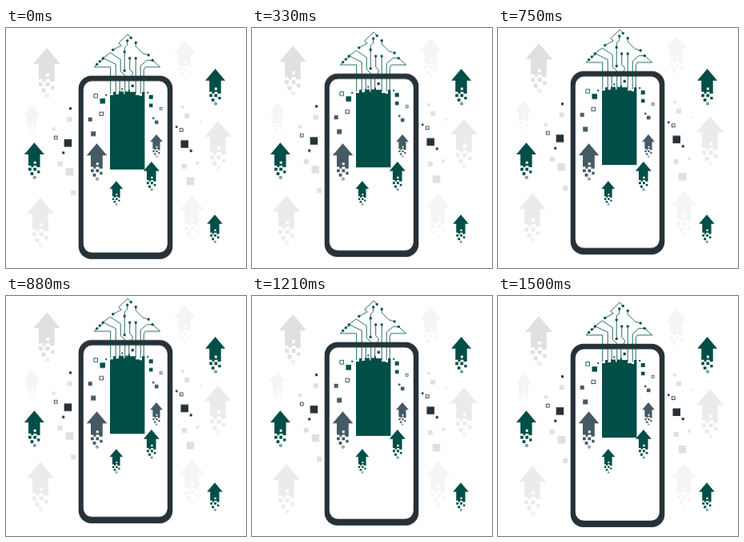
An HTML page for the animation above (1540 ms loop, 300 px wide and 300 px high).

```html
<!DOCTYPE html>
<html lang="en">
<head>
<meta charset="utf-8">
<title>Upload</title>
<style>
  html, body { margin: 0; width: 100%; height: 100%; overflow: hidden; background: #fff; }
  svg { display: block; width: 100vw; height: 100vh; }
  #float { animation: float 1540ms linear infinite; }
  @keyframes float {
    0%, 100% { transform: translateY(-.16px); }
    47.4% { transform: translateY(-6px); }
    96.1% { transform: translateY(0); }
  }
  .wire { fill: none; stroke: #004e48; stroke-width: .85; }
  .teal { fill: #004e48; }
  .ink { fill: #263238; }
</style>
</head>
<body>
<svg viewBox="0 0 300 300">
  <defs>
    <!-- Arrow 34 wide, tip at the origin, dissolving into squares -->
    <g id="arrow">
      <path fill-rule="evenodd" d="M0 0L17 20H9.7V42H4V39H-1.5V42H-5.5V39H-10V20H-17ZM-1 32V36H3V32Z"/>
      <path d="M-10 43h5v5h-5zM-1.5 43h5v5h-5zM5 47.5h4.5v4.5h-4.5zM-6.5 50.5h5v5h-5z"/>
      <path d="M-1 57.8h3.2v3.2h-3.2z" fill="none" stroke="currentColor" stroke-width="1.1"/>
    </g>
  </defs>
  <g id="float">
    <g id="far"></g>
    <rect class="ink" x="90.7" y="59.7" width="117.6" height="229.3" rx="16"/>
    <rect x="96.8" y="66.6" width="105" height="214.2" rx="10.5" fill="#fff"/>
    <path class="teal" d="M130 177.1V84H134V80H137V83H141V79.5H147V82.5H149V79.5H153V77.5H155V80H162V84H167V85H170V80H173.4V177.1Z"/>
    <g transform="translate(.2 .4)">
      <g class="wire">
        <path d="M156 12L152 7.5L140.5 18.5L144 21.5L133.5 27"/>
        <path d="M151.5 15.5V21L148 24.5V29.5"/>
        <path d="M162 18V22.5L171 31.5L178 33.5"/>
        <path d="M121 37.5L130 30.5L143 39V54L148.5 59V82"/>
        <path d="M117 41.5L122.5 38L137 45V82"/>
        <path d="M113.5 45L110 48.5H130.5V82"/>
        <path d="M148 29.5V53"/>
        <path d="M154.5 37.5V51L158 55V58L153.5 62V82"/>
        <path d="M162 37.5V82M142 82V62"/>
        <path d="M183 40H176L168 47V82"/>
        <path d="M183 40L192.5 48.5H174L172 52V82"/>
      </g>
      <g id="dots" class="teal"></g>
      <g id="bits"></g>
    </g>
  </g>
  <g id="near"></g>
</svg>
<script>
  const teal = '#004e48', ink = '#263238', slate = '#455a64', pale = '#e0e0e0';
  const fill = (id, items, draw) => {
    document.getElementById(id).innerHTML = items.map(draw).join('');
  };

  const arrow = ([x, y, w, c]) =>
    `<use href="#arrow" fill="${c}" color="${c}" transform="translate(${x} ${y}) scale(${w / 34})"/>`;
  const dot = ([x, y]) => `<circle cx="${x}" cy="${y}" r="1.7"/>`;
  const bit = ([x, y, s, c, open]) =>
    `<rect x="${x - s / 2}" y="${y - s / 2}" width="${s}" height="${s}" ` +
    (open ? `fill="none" stroke="${c}" stroke-width=".85"/>` : `fill="${c}"/>`);

  fill('far', [
    [51, 25, 34, pale], [223.3, 16, 27, '#f5f5f5'], [32, 97, 21, '#f5f5f5'],
    [43, 212.3, 34, '#ebebeb'], [265, 116.3, 34, '#ebebeb'], [232.5, 209.3, 31, '#f5f5f5']
  ], arrow);

  fill('near', [
    [35.4, 143.2, 25, teal], [261.6, 51, 25, teal], [261, 233.3, 19.5, teal],
    [113.5, 144.2, 25.5, slate], [188, 133, 15.8, slate],
    [181.8, 167, 20, teal], [137.8, 191.3, 16.7, teal]
  ], arrow);

  fill('dots', [
    [156, 12], [151.5, 15.5], [162, 18], [133.5, 27], [148, 29.5], [178, 33.5], [183, 40],
    [121, 37.5], [117, 41.5], [113.5, 45], [148, 53], [154.5, 37.5], [162, 37.5]
  ], dot);

  fill('bits', [
    [112, 84.5, 4.6, teal, 1], [120.5, 91, 6.5, teal], [125, 83.5, 2, teal],
    [158, 72, 3.2, ink], [145, 76, 2, teal], [177, 80.5, 2, teal],
    [181, 86, 5, teal], [181, 96.5, 4.5, teal], [119, 107, 4.4, ink, 1],
    [105, 114, 5, slate], [109, 132, 6, slate], [188, 117.5, 4.5, slate],
    [184, 112.5, 2.5, slate], [193.5, 100.5, 2.8, slate, 1],
    [80.3, 100.3, 3, ink], [62, 136.7, 3.8, ink, 1], [77.2, 143.5, 9.5, ink], [71.5, 155.7, 3, ink],
    [59.5, 126, 4, pale], [79.5, 114, 6, pale], [67.5, 169.3, 6, pale],
    [79.2, 179.3, 9.5, pale], [84, 205.7, 6, pale],
    [213, 123.3, 2.5, ink], [219, 127.3, 3.8, ink, 1], [223, 144.8, 9.5, ink], [231, 153.3, 3, ink],
    [220.7, 98.3, 3.5, pale], [226, 109.3, 6, pale], [243, 117, 2, pale],
    [239, 168.5, 3.5, pale], [222.5, 172.5, 6, pale], [230.3, 191.3, 9.5, pale]
  ], bit);
</script>
</body>
</html>
```
